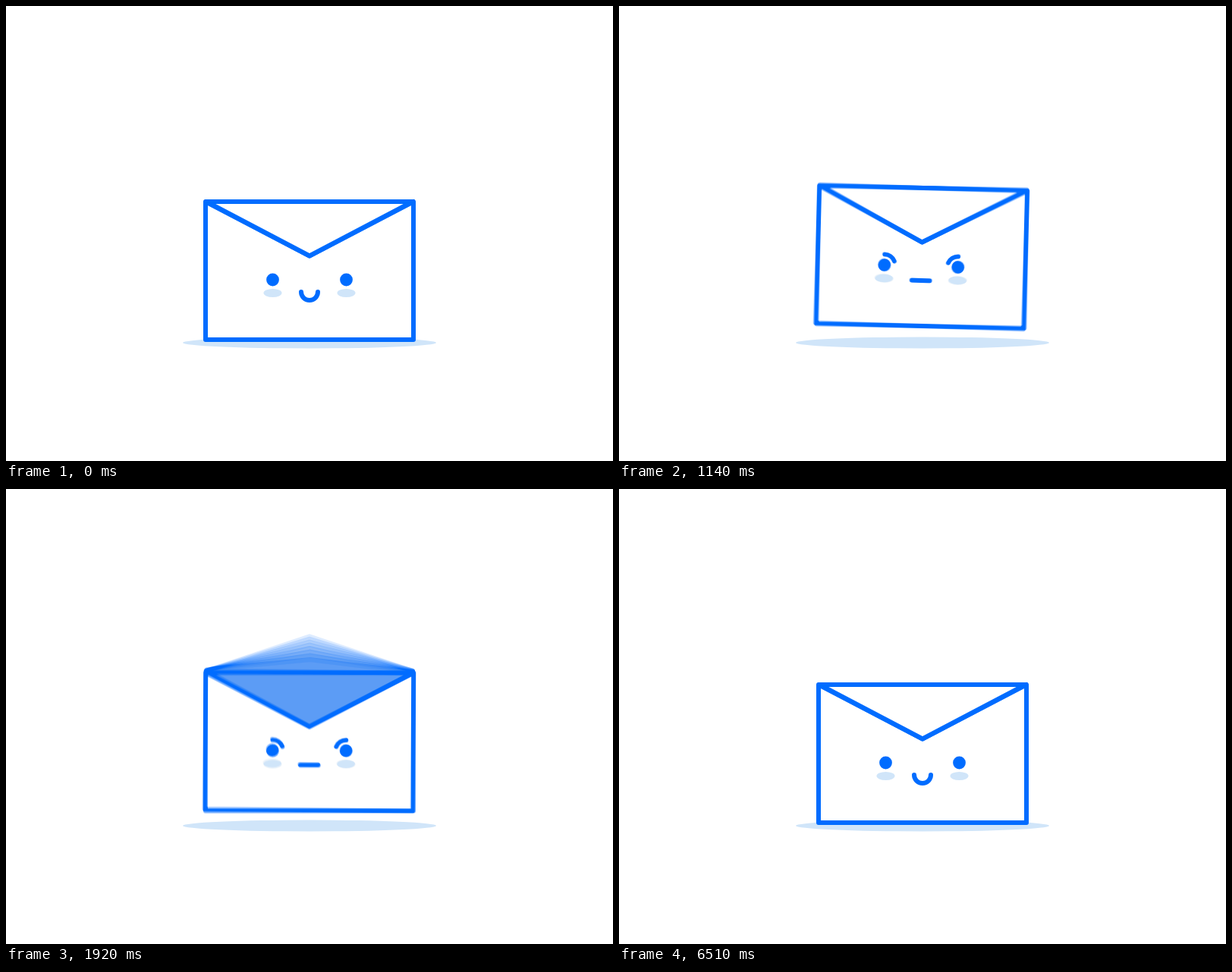
Write an HTML page with a canvas that moves like this. It is 800x600 px and loops after 7170 ms.

```html
<!DOCTYPE html>
<html lang="en">
<head>
<meta charset="utf-8">
<title>Envelope</title>
<style>
  html, body { margin: 0; width: 100%; height: 100%; overflow: hidden; background: #fff; }
  canvas { display: block; width: 100%; height: 100%; }
</style>
</head>
<body>
<canvas id="stage" width="800" height="600"></canvas>
<script>
const W = 800, H = 600, LOOP = 7170, STEP = 30, SHUTTER = 20, SAMPLES = 8;
const BLUE = '#006cff', MID = '#5c9cf5', PALE = '#d0e5f9', WHITE = '#fff';
const PIVOT = 305, LIFT = 18, CX = 400, EYE_Y = 361, EYES = [351.5, 448.5];

const stage = document.getElementById('stage').getContext('2d');
const layer = document.createElement('canvas');
layer.width = W;
layer.height = H;
const c = layer.getContext('2d');

const span = (t, a, b) => Math.min(1, Math.max(0, (t - a) / (b - a)));
const easeIn = u => u * u;
const easeOut = u => 1 - (1 - u) * (1 - u);
const easeInOut = u => (1 - Math.cos(Math.PI * u)) / 2;
const mix = (a, b, u) => a + (b - a) * u;

function paint(fill, stroke, width = 6) {
  if (fill) { c.fillStyle = fill; c.fill(); }
  if (stroke) { c.strokeStyle = stroke; c.lineWidth = width; c.stroke(); }
}

function trace(points, closed) {
  c.beginPath();
  points.forEach(([x, y]) => c.lineTo(x, y));
  if (closed) c.closePath();
}

function oval(x, y, rx, ry, fill) {
  c.beginPath();
  c.ellipse(x, y, rx, ry, 0, 0, 2 * Math.PI);
  paint(fill);
}

function arc(x, y, rx, ry, from, to, reverse = false) {
  c.beginPath();
  c.ellipse(x, y, rx, ry, 0, from, to, reverse);
}

// Turns the drawing about the upper middle of the envelope
function tilt(degrees) {
  c.translate(CX, PIVOT);
  c.rotate(degrees * Math.PI / 180);
  c.translate(-CX, -PIVOT);
}

function pose(t) {
  const shaking = t > 601 && t < 1931;
  const angle = shaking ? 4 * Math.sin(2 * Math.PI * (t - 601) / 380) : 0;
  const lift = LIFT * (easeOut(span(t, 540, 650)) - easeIn(span(t, 1900, 1990)));
  const open = easeOut(span(t, 1890, 1970)) - easeInOut(span(t, 6330, 6500));

  let drop = 130;
  if (t < 2020) drop = mix(130, -12, easeOut(span(t, 1945, 2020)));
  else if (t < 6240) drop = mix(-12, 0, easeInOut(span(t, 2020, 2068)));
  else drop = 130 * easeIn(span(t, 6240, 6322));

  return { angle, lift, drop, flap: 1 - 2 * open, frown: span(t, 540, 630) };
}

function drawFlap(f) {
  const shoulder = 258 + Math.min(0, 5 * f);
  const tip = f < 0 ? 258 + 73 * f : 258 + 71.5 * f;
  trace([[264, 258], [264, shoulder], [CX, tip], [536, shoulder], [536, 258]], true);
  paint(f < 0 ? MID : WHITE, BLUE);
}

function drawLetter(drop) {
  const top = 147 + drop;
  c.save();
  trace([[255, 0], [545, 0], [545, 254], [CX, 329.5], [255, 254]], true);
  c.clip();
  c.beginPath();
  c.roundRect(297, top, 206, 250, 3);
  paint(WHITE);
  c.save();
  c.clip();
  trace([[264, 251.5], [CX, 323], [536, 251.5]]);
  paint(null, PALE, 7);
  c.restore();
  c.beginPath();
  c.roundRect(297, top, 206, 250, 3);
  paint(null, BLUE);
  for (let i = 0; i < 3; i++) {
    const y = top + 36.7 + 45 * i;
    trace([[339, y], [461, y]]);
    paint(null, BLUE);
  }
  c.restore();
}

function drawFace(mood, frown) {
  const happy = mood === 'happy';
  EYES.forEach((x, i) => {
    oval(x, 378.5, 12, 5.5, PALE);
    if (happy) {
      arc(x, EYE_Y, 11.5, 11.5, Math.PI, 2 * Math.PI);
      paint(null, BLUE);
      return;
    }
    oval(x, EYE_Y, 8.4, 8.4, BLUE);
    if (mood === 'angry' && frown > 0) {
      const up = -Math.PI / 2, side = i ? -1 : 1;
      arc(x, EYE_Y, 14, 14, up, up + side * 1.18 * frown, side < 0);
      paint(null, BLUE, 5.8);
    }
  });

  if (happy) {
    arc(CX, 369.5, 20.5, 20.5, 0, Math.PI);
    c.closePath();
    paint(MID, BLUE, 3);
  } else {
    const flat = mood === 'angry' ? frown : 0;
    arc(CX, 377 + 3 * flat, 11 + 0.75 * flat, 11 * (1 - flat), 0, Math.PI);
    paint(null, BLUE);
  }
}

function drawScene(t, mood) {
  const p = pose(t);
  c.fillStyle = WHITE;
  c.fillRect(0, 0, W, H);
  c.lineCap = c.lineJoin = 'round';
  oval(CX, 444, 167, 7.5, PALE);

  c.save();
  c.translate(0, -p.lift);
  c.save();
  tilt(p.angle);

  // Inside of the envelope
  trace([[264, 258], [536, 258], [CX, 329.5]], true);
  paint(MID, BLUE);
  if (p.flap < 0) drawFlap(p.flap);
  if (p.drop < 125) drawLetter(p.drop);

  // Front
  trace([[263, 258], [CX, 329.5], [537, 258], [537, 440], [263, 440]], true);
  paint(WHITE, BLUE);
  if (p.flap >= 0) drawFlap(p.flap);
  c.restore();

  tilt(p.angle * 1.25);
  drawFace(mood, p.frown);
  c.restore();
}

function moodAt(t) {
  if (t < 540 || t >= 6420) return 'calm';
  return t < 1980 ? 'angry' : 'happy';
}

// Averages several moments of one step to give motion blur
function render(t) {
  const moving = (t >= 540 && t < 2070) || (t >= 6240 && t < 6510);
  const count = moving ? SAMPLES : 1;
  const mood = moodAt(t);
  for (let i = 0; i < count; i++) {
    drawScene(t + SHUTTER * i / count, mood);
    stage.globalAlpha = 1 / (i + 1);
    stage.drawImage(layer, 0, 0);
  }
}

let shown = -1;
function tick() {
  const t = Math.floor((performance.now() % LOOP) / STEP) * STEP;
  if (t !== shown) {
    shown = t;
    render(t);
  }
  requestAnimationFrame(tick);
}
tick();
</script>
</body>
</html>
```
